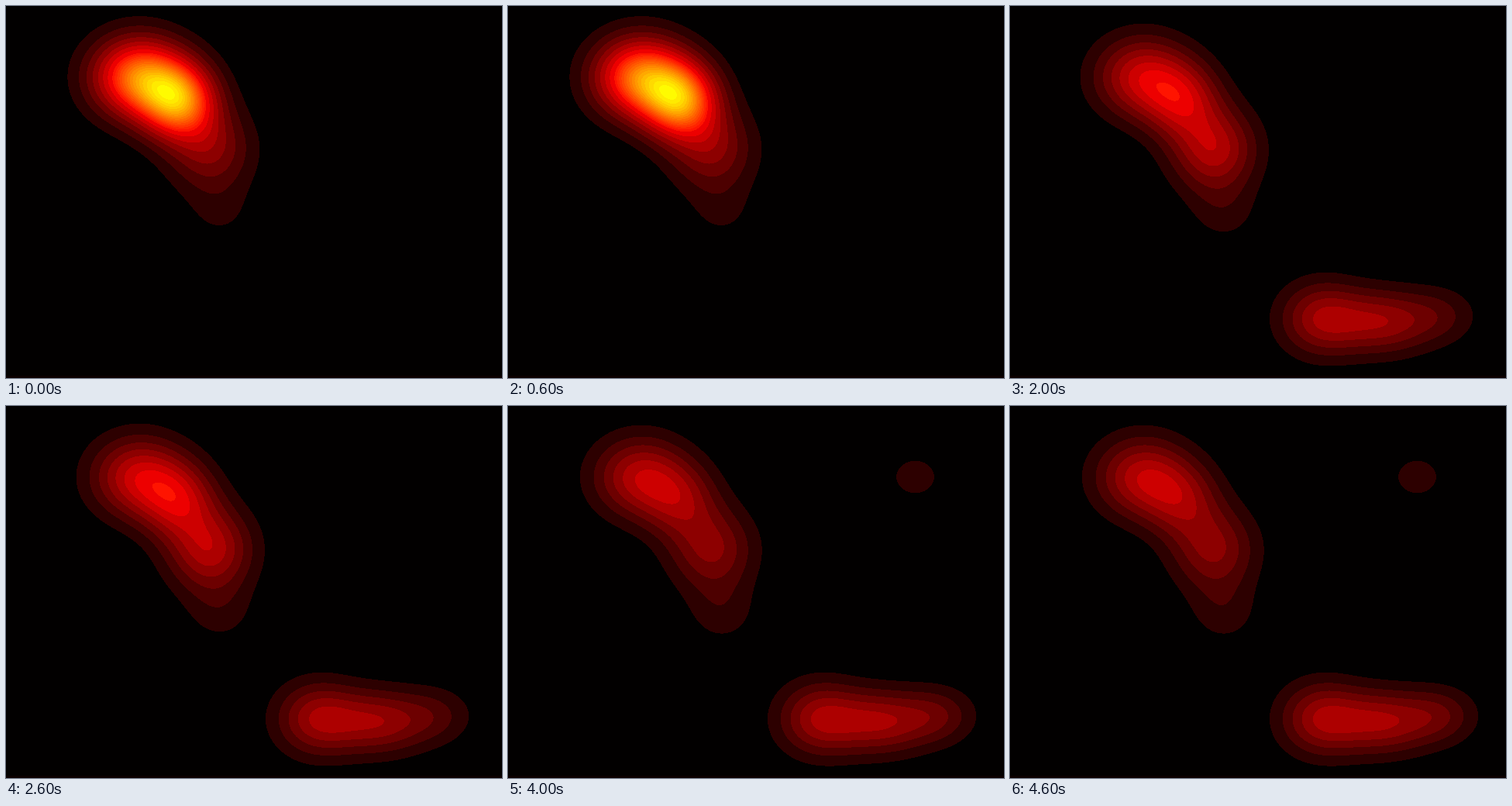
Animation of 640x480 px, one loop 5 s. Source, as an HTML page with a canvas:

```html
<!DOCTYPE html>
<html lang="en">
<head>
<meta charset="utf-8">
<title>Heat map</title>
<style>
html, body { margin: 0; width: 100%; height: 100%; overflow: hidden; background: #000; }
canvas { display: block; }
</style>
</head>
<body>
<canvas id="map" width="640" height="480"></canvas>
<script>
const W = 640, H = 480, STEP = 1000;
const ctx = document.getElementById('map').getContext('2d');

// Gaussian hills: centre, spread, and height in each of the five steps
const hills = [
  // upper left: head, middle, tail, foot
  { x: 170, y: 91, sx: 42, sy: 36, height: [10.5, 13.5, 6.1, 5.2, 5.5] },
  { x: 222, y: 122, sx: 34, sy: 34, height: [10.5, 14, 5.1, 3.4, 3.6] },
  { x: 263, y: 185, sx: 38, sy: 38, height: [4, 7.3, 5.5, 4.1, 4.1] },
  { x: 276, y: 266, sx: 32, sy: 30, height: [1, 1.05, 1.25, 1.15, 1.4] },
  // lower right: head, middle, tip
  { x: 402, y: 403, sx: 38, sy: 33, height: [0, 2.1, 4.8, 5.4, 4.8] },
  { x: 482, y: 407, sx: 42, sy: 29, height: [0, 1.7, 4.4, 5.4, 4.6] },
  { x: 555, y: 399, sx: 34, sy: 26, height: [0, 0.55, 1.9, 2.4, 2.6] },
  // upper right
  { x: 525, y: 91, sx: 27, sy: 23, height: [0, 0, 0, 1.35, 1.5] }
];

const bell = (v, mid, spread) => Math.exp(-(((v - mid) / spread) ** 2) / 2);

// Each hill is a product of one bell per axis
for (const h of hills) {
  h.across = Array.from({ length: W }, (_, x) => bell(x, h.x, h.sx));
  h.down = Array.from({ length: H }, (_, y) => bell(y, h.y, h.sy));
}

// Ramp from black through red and yellow to white, in flat bands
function heat(value) {
  if (value < 1) return [2, 0, 0];
  const band = value < 8 ? Math.floor(value) : Math.floor(value * 2) / 2;
  return [13 + 32 * band, 20 + 33 * (band - 8), 46 * (band - 15)];
}

function render(step) {
  const image = ctx.createImageData(W, H);
  const active = hills.filter(h => h.height[step] > 0);
  for (let y = 0, i = 0; y < H; y++) {
    const rows = active.map(h => h.height[step] * h.down[y]);
    for (let x = 0; x < W; x++, i += 4) {
      let value = 0;
      for (let k = 0; k < active.length; k++) value += rows[k] * active[k].across[x];
      const [r, g, b] = heat(value);
      image.data[i] = r;
      image.data[i + 1] = g;
      image.data[i + 2] = b;
      image.data[i + 3] = 255;
    }
  }
  return image;
}

const scenes = hills[0].height.map((_, step) => render(step));

function draw(step) {
  ctx.putImageData(scenes[step], 0, 0);
  ctx.fillStyle = '#0b0000';
  ctx.fillRect(0, H - 3, W, 3);
}

const start = performance.now();
let shown = -1;
function tick() {
  const step = Math.floor((performance.now() - start) / STEP) % scenes.length;
  if (step !== shown) draw(shown = step);
  requestAnimationFrame(tick);
}
tick();
</script>
</body>
</html>
```
